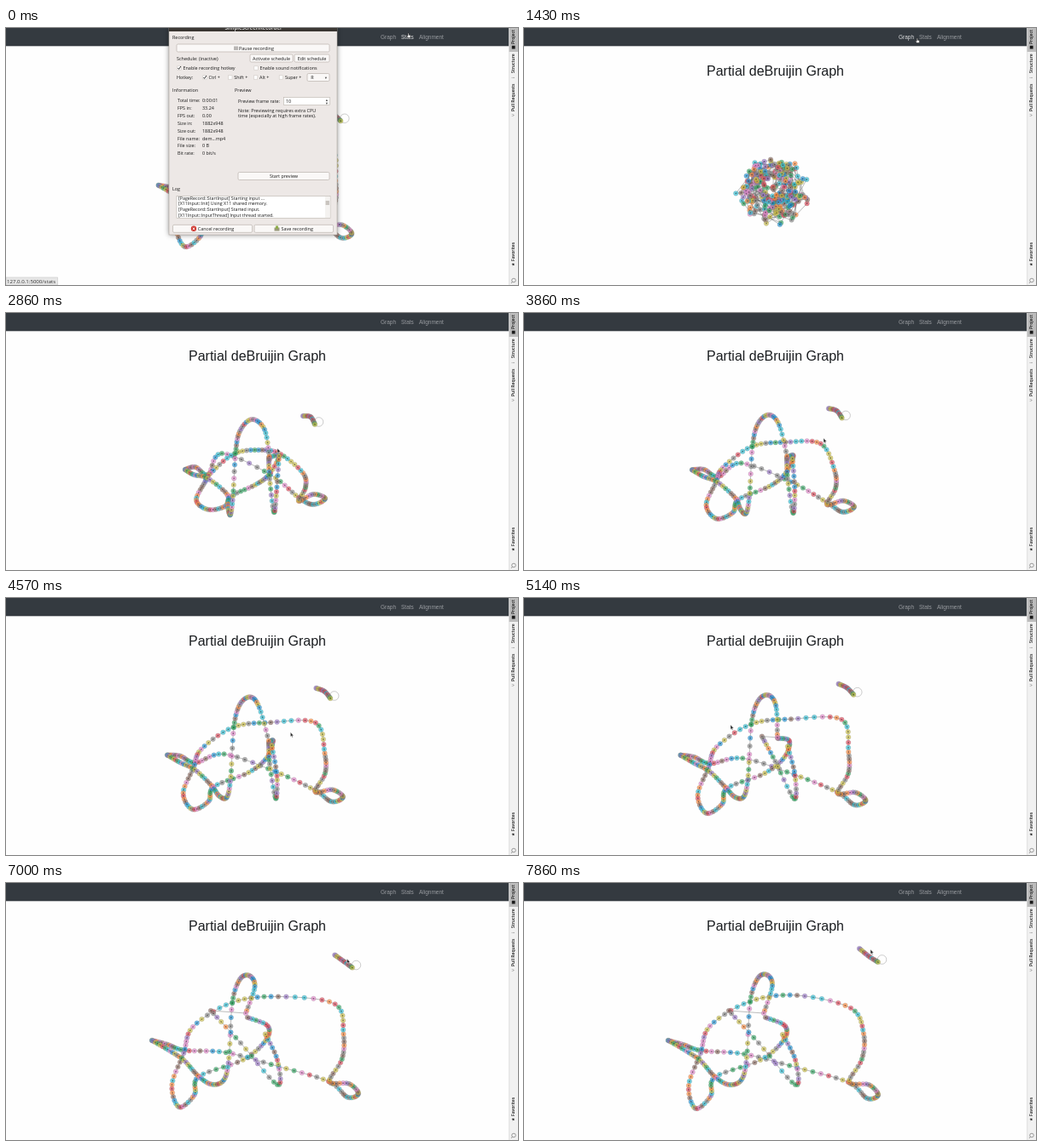
Animation of 600 by 302 pixels, one loop 8 s. Source, as an HTML page with a canvas:

```html
<!DOCTYPE html>
<html lang="en">
<head>
<meta charset="utf-8">
<title>Partial deBruijin Graph</title>
<style>
html, body { margin: 0; width: 100%; height: 100%; overflow: hidden; background: #fff; }
canvas { display: block; width: 600px; height: 302px; }
</style>
</head>
<body>
<canvas id="stage"></canvas>
<script>
const W = 600, H = 302, LOOP = 8000, STEPS_PER_SEC = 7, LAST_STEP = 55;
const LOADED = 9, SETTLED = 20;
const canvas = document.getElementById('stage');
const ctx = canvas.getContext('2d');
const dpr = window.devicePixelRatio || 1;
canvas.width = W * dpr;
canvas.height = H * dpr;

const UI = '"Open Sans", "Noto Sans", sans-serif';
const PAGE = '"Liberation Sans", Arial, sans-serif';
const SYMBOL = '"DejaVu Sans", sans-serif';
const COLORS = ['#1f93d8', '#ff8a3c', '#30a862', '#e2475a', '#9a76c8',
  '#8c6a60', '#e486cb', '#888888', '#cbbf45', '#2abfd6'];

// Key points (x, y) of each strand; every gap holds the same number of nodes,
// so close key points make a dense stretch.
const NODES_PER_GAP = 7, CORNER = 12;
const settled = {
  body: [210,184, 222,181, 237,190, 253,165, 310,190, 343,217, 360,225, 374,218,
    360,213, 343,221, 351,205, 348,188, 322,166, 300,161, 268,165, 240,188, 233,199,
    223,220, 237,231, 257,227, 264,215, 292,202, 308,190, 320,168, 308,170],
  arch: [210,184, 220,190, 236,194, 259,213, 260,228, 263,237, 266,215, 269,165,
    274,139, 288,125, 303,137, 309,172],
  leg: [308,172, 309,195, 314,234, 317,210, 320,168],
  bit: [348,121, 357,122, 362,131]
};
const unfolded = {
  body: [169,185, 187,190, 208,197, 258,201, 320,217, 380,234, 402,253, 415,249,
    404,237, 381,234, 396,207, 398,177, 383,147, 320,132, 265,139, 218,168, 207,200,
    193,238, 201,265, 219,250, 224,228, 277,208, 304,185, 306,168, 283,158],
  arch: [169,185, 188,196, 207,209, 223,227, 240,237, 255,231, 261,205, 265,140,
    274,112, 285,108, 291,121, 281,153],
  leg: [240,150, 275,188, 318,237, 318,208, 303,178],
  bit: [393,77, 404,86, 415,93]
};

// Step, x, y
const POINTER = [[0, 471, 6], [5, 471, 6], [8, 457, 12], [16, 470, 12], [20, 318, 159],
  [27, 351, 147], [30, 374, 143], [33, 313, 165], [36, 242, 149], [43, 393, 100], [55, 406, 78]];

const mix = (a, b, u) => a + (b - a) * u;
const clamp = (v) => Math.min(1, Math.max(0, v));
const rand = (n) => {
  const s = Math.sin(n * 127.1 + 11.7) * 43758.5453;
  return s - Math.floor(s);
};

function spline(a, b, c, d, u) {
  return b + 0.5 * u * (c - a + u * (2 * a - 5 * b + 4 * c - d + u * (3 * (b - c) + d - a)));
}

function strandNodes(points) {
  const last = points.length - 1, nodes = [];
  const at = (i) => points[Math.min(last, Math.max(0, i))];
  for (let i = 0; i < last; i++)
    for (let j = 0; j < NODES_PER_GAP; j++)
      nodes.push([0, 1].map(k =>
        spline(at(i - 1)[k], at(i)[k], at(i + 1)[k], at(i + 2)[k], j / NODES_PER_GAP)));
  nodes.push(points[last]);
  return nodes;
}

// The layout relaxes with an ease-out; the loose ends wait until they are dragged,
// and the corner of the body is tugged outwards on the way.
function graphAt(step) {
  const u = clamp((step - SETTLED) / (LAST_STEP - SETTLED));
  const ease = 1 - Math.pow(1 - u, 1.7);
  const haul = clamp((step - 33) / 7);
  const tug = 11 * Math.sin(Math.PI * u);
  const strands = {};
  for (const name in settled) {
    const from = settled[name], to = unfolded[name], count = from.length / 2;
    const points = Array.from({ length: count }, (_, i) => {
      const loose = name === 'leg' ? i < 2 : i === count - 1;
      const p = name === 'bit' ? u : loose ? haul : ease;
      return [mix(from[2 * i], to[2 * i], p), mix(from[2 * i + 1], to[2 * i + 1], p)];
    });
    if (name === 'body') {
      points[CORNER][0] += tug;
      points[CORNER][1] -= tug;
    }
    strands[name] = strandNodes(points);
  }
  return strands;
}

// Pull every node towards a seeded place in a round cluster, near its neighbours.
function tangle(strands, spread) {
  Object.values(strands).flat().forEach((p, n) => {
    const angle = n * 0.37 + rand(n) * 1.6;
    const r = 45 * Math.pow(mix(rand(n + 500), rand(Math.floor(n / 4) + 70), 0.55), 0.85);
    p[0] = mix(291 + r * Math.cos(angle), p[0], spread);
    p[1] = mix(190 + r * Math.sin(angle), p[1], spread);
  });
}

function polyline(points) {
  ctx.beginPath();
  points.forEach(p => ctx.lineTo(p[0], p[1]));
  ctx.stroke();
}

function circle(x, y, r) {
  ctx.beginPath();
  ctx.arc(x, y, r, 0, Math.PI * 2);
}

function drawGraph(step, spread) {
  const strands = graphAt(step);
  if (spread < 1) tangle(strands, spread);
  const end = strands.bit.at(-1);
  ctx.strokeStyle = 'rgba(95,95,95,.7)';
  ctx.lineWidth = 0.6;
  Object.values(strands).forEach(polyline);
  polyline([strands.leg[0], strands.arch.at(-1)]);
  ctx.strokeStyle = '#aaa';
  circle(end[0] + 4.5, end[1] - 3, 5.3);
  ctx.stroke();

  Object.values(strands).flat().forEach(([x, y], n) => {
    ctx.globalAlpha = 0.66;
    ctx.fillStyle = COLORS[Math.floor(rand(n + 900) * COLORS.length)];
    circle(x, y, 2.8);
    ctx.fill();
    ctx.globalAlpha = 1;
    ctx.strokeStyle = 'rgba(120,120,120,.35)';
    ctx.stroke();
    ctx.fillStyle = 'rgba(30,30,30,.5)';
    circle(x, y, 0.85);
    ctx.fill();
  });
}

function text(s, x, y, { size = 5.45, color = '#1a1a1a', font = UI, align = 'left', weight = 400 } = {}) {
  ctx.font = `${weight} ${size}px ${font}`;
  ctx.fillStyle = color;
  ctx.textAlign = align;
  ctx.fillText(s, x, y);
}

function box(x, y, w, h, fill, edge) {
  ctx.fillStyle = fill;
  ctx.fillRect(x, y, w, h);
  if (edge) {
    ctx.strokeStyle = edge;
    ctx.lineWidth = 0.6;
    ctx.strokeRect(x, y, w, h);
  }
}

function button(label, x, y, w, shift = 0) {
  ctx.beginPath();
  ctx.roundRect(x, y, w, 9, 1.5);
  ctx.fillStyle = '#faf8f7';
  ctx.fill();
  ctx.strokeStyle = '#bbb4ae';
  ctx.lineWidth = 0.7;
  ctx.stroke();
  text(label, x + w / 2 + shift, y + 6.6, { align: 'center' });
}

function checkbox(label, x, y, on) {
  box(x - 2.2, y - 4.2, 4.4, 4.4, '#fff', '#d0cac5');
  if (on) {
    ctx.strokeStyle = '#222';
    ctx.lineWidth = 0.9;
    polyline([[x - 1.6, y - 2], [x - 0.4, y - 0.6], [x + 1.8, y - 4]]);
  }
  text(label, x + 4.5, y);
}

function arrow(glyph, x, y) {
  text(glyph, x, y, { size: 4.5, color: '#444', font: SYMBOL, align: 'center' });
}

function drawRecorder() {
  ctx.save();
  ctx.shadowColor = 'rgba(0,0,0,.45)';
  ctx.shadowBlur = 6 * dpr;
  box(191, -5, 197, 248, '#ede8e6');
  ctx.restore();
  box(191, 0, 197, 243, '#ede8e6', '#aaa39d');
  box(191, 0, 197, 4, '#3a3632');
  text('SimpleScreenRecorder', 290, 1.6, { size: 6.2, color: '#ddd', align: 'center', weight: 600 });

  text('Recording', 195, 13);
  button('Pause recording', 200, 19, 179, 4);
  box(267, 21.5, 5, 4.5, '#b9b6b4');
  text('Schedule: (inactive)', 200, 38);
  button('Activate schedule', 286, 31, 50);
  button('Edit schedule', 338, 31, 41);
  checkbox('Enable recording hotkey', 203, 49, true);
  checkbox('Enable sound notifications', 293, 49);
  text('Hotkey:', 200, 60);
  ['Ctrl +', 'Shift +', 'Alt +', 'Super +'].forEach((key, i) =>
    checkbox(key, 233 + i * 29.8, 60, i === 0));
  button('R', 353, 53.5, 26, -7);
  arrow('▾', 375, 60);

  text('Information', 195, 75);
  [['Total time:', '0:00:01'], ['FPS in:', '33.24'], ['FPS out:', '0.00'],
    ['Size in:', '1882x948'], ['Size out:', '1882x948'], ['File name:', 'dem…mp4'],
    ['File size:', '0 B'], ['Bit rate:', '0 bit/s']].forEach(([name, value], i) => {
    text(name, 201, 87 + i * 8.9);
    text(value, 230, 87 + i * 8.9);
  });

  text('Preview', 268, 75);
  text('Preview frame rate:', 272, 88);
  box(325.5, 81.5, 54, 9, '#fff', '#bbb4ae');
  text('10', 328, 88);
  arrow('▴', 376, 85.5);
  arrow('▾', 376, 90);
  text('Note: Previewing requires extra CPU', 272, 98.5);
  text('time (especially at high frame rates).', 272, 105.2);
  button('Start preview', 272, 169.5, 107);

  text('Log', 195, 191);
  box(200, 197.5, 180, 26, '#fff', '#bbb4ae');
  ctx.save();
  ctx.beginPath();
  ctx.rect(200, 198, 174, 25.3);
  ctx.clip();
  ['[PageRecord::StartInput] Starting input ...', '[X11Input::Init] Using X11 shared memory.',
    '[PageRecord::StartInput] Started input.', '[X11Input::InputThread] Input thread started.']
    .forEach((line, i) => text(line, 202, 201.7 + i * 6.6, { size: 5.3 }));
  ctx.restore();
  box(374, 198, 5.5, 25, '#f4f2f0');
  box(374.6, 203, 4.3, 5, '#c9c4bf');

  button('Cancel recording', 195.5, 231.3, 93, 4);
  ctx.fillStyle = '#cf3a32';
  circle(220, 235.8, 3.2);
  ctx.fill();
  ctx.strokeStyle = '#fff';
  ctx.lineWidth = 0.9;
  polyline([[218.7, 234.5], [221.3, 237.1]]);
  polyline([[221.3, 234.5], [218.7, 237.1]]);
  button('Save recording', 291, 231.3, 92.5, 4);
  box(314.5, 234.5, 6, 4, '#9a9a7c');
  box(316, 232.5, 3, 3.5, '#8fae4c');
}

function sideLabel(label, bottom, icon) {
  ctx.save();
  ctx.translate(596.3, bottom);
  ctx.rotate(-Math.PI / 2);
  text(label, 0, 0, { size: 5, weight: 600 });
  text(icon, -6, 0, { size: 5, font: SYMBOL });
  ctx.restore();
}

function drawSidebar() {
  box(589.5, 0, 10.5, H, '#f1f1f1');
  box(589.5, 0, 10.5, 28, '#bcbcbc');
  box(589.5, 0, 0.6, H, '#cfcfcf');
  sideLabel('Project', 19, '■');
  sideLabel('Structure', 53, '⁝');
  sideLabel('Pull Requests', 98, '⑂');
  sideLabel('Favorites', 274, '★');
  ctx.strokeStyle = '#777';
  ctx.lineWidth = 0.7;
  circle(595, 296.5, 2.3);
  ctx.stroke();
  polyline([[593.4, 298.2], [592, 300]]);
}

function drawNav(active) {
  box(0, 0, 589.5, 21.3, '#343a40');
  [['Graph', 439], ['Stats', 463], ['Alignment', 484]].forEach(([name, x]) =>
    text(name, x, 12.6, { size: 6.5, color: name === active ? '#dcddde' : '#989b9f', font: PAGE }));
}

function drawStatus(path) {
  box(0, 293, 60.5, 9, '#e6e6e6', '#c8c8c8');
  text('127.0.0.1:5000/' + path, 1, 299.6, { size: 6.1, color: '#333' });
}

function drawPointer(step, hand) {
  const i = POINTER.findIndex((p, k) => k > 0 && step <= p[0]);
  const a = POINTER[i - 1], b = POINTER[i];
  const u = (step - a[0]) / (b[0] - a[0]);
  const shape = hand
    ? [[0, 0], [1, 0], [1.2, 2.2], [3.2, 2.8], [3, 5.4], [0, 5.6], [-1.8, 3], [0, 3.4]]
    : [[0, 0], [0, 5.4], [1.2, 4.4], [2, 6.2], [2.9, 5.8], [2.1, 4.1], [3.7, 4]];
  ctx.save();
  ctx.translate(mix(a[1], b[1], u), mix(a[2], b[2], u));
  ctx.beginPath();
  shape.forEach(p => ctx.lineTo(p[0], p[1]));
  ctx.closePath();
  ctx.fillStyle = hand ? '#fff' : '#222';
  ctx.strokeStyle = hand ? '#222' : '#eee';
  ctx.lineWidth = 0.5;
  ctx.fill();
  ctx.stroke();
  ctx.restore();
}

function draw(step) {
  const loaded = step >= LOADED;
  const onLink = step < 17;
  const onStats = step < 7 || step > 14;
  ctx.setTransform(dpr, 0, 0, dpr, 0, 0);
  box(0, 0, W, H, '#fefefe');
  drawNav(onLink ? (onStats ? 'Stats' : 'Graph') : '');
  text('Partial deBruijin Graph', 294.5, 56, { size: 16, color: '#1b1e21', font: PAGE, align: 'center' });
  const spread = 1 - Math.pow(1 - clamp((step - 10) / (SETTLED - 10)), 2.6);
  drawGraph(loaded ? step : 40, loaded ? spread : 1);
  drawSidebar();
  if (!loaded || (step > 10 && onLink)) drawStatus(onStats ? 'stats' : 'graph');
  if (step < 2) drawRecorder();
  drawPointer(step, onLink);
}

let shown = -1;
const start = performance.now();
function tick() {
  const t = (performance.now() - start) % LOOP;
  const step = Math.min(LAST_STEP, Math.floor((t + 7) * STEPS_PER_SEC / 1000));
  if (step !== shown) draw(shown = step);
  requestAnimationFrame(tick);
}
tick();
</script>
</body>
</html>
```
